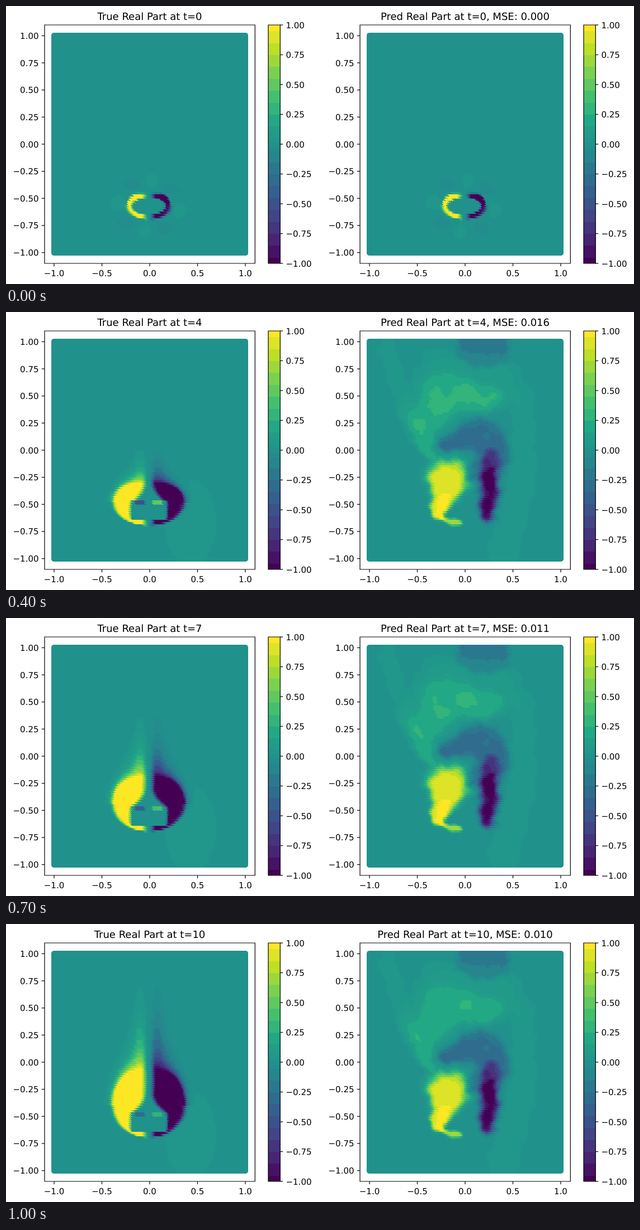
Write an HTML page with a canvas that moves like this. It is 1123 px wide and 499 px high and loops after 1.1 s.

```html
<!DOCTYPE html>
<html lang="en">
<head>
<meta charset="utf-8">
<title>True and predicted real part</title>
<style>
  html, body { margin: 0; width: 100%; height: 100%; overflow: hidden; background: #fff; }
  canvas, svg { position: absolute; left: 0; top: 0; width: 1123px; height: 499px; }
  text { font: 15px "DejaVu Sans", sans-serif; fill: #000; text-rendering: geometricPrecision; }
  .title { font-size: 18px; text-anchor: middle; }
  .line { fill: none; stroke: #000; stroke-width: 1.2; }
</style>
</head>
<body>
<canvas id="field" width="1123" height="499"></canvas>
<svg id="axes" viewBox="0 0 1123 499"></svg>
<script>
const STEP = 100, STEPS = 11, SHIFT = 564;
const CX = 257, CY = 248, HALF_X = 171, HALF_Y = 194.6;
const ctx = document.getElementById('field').getContext('2d');
const svg = document.getElementById('axes');
const clamp = (v, lo = 0, hi = 1) => Math.max(lo, Math.min(hi, v));
const sigmoid = v => 1 / (1 + Math.exp(-v));

// ---- colours: viridis in flat bands ----
const viridis = ['440154', '482475', '414487', '355f8d', '2a788e', '21918c',
  '22a884', '44bf70', '7ad151', 'bddf26', 'fde725']
  .map(h => [0, 2, 4].map(i => parseInt(h.slice(i, i + 2), 16)));

function color(v) {
  v = clamp(v, -1, 1);
  const n = Math.abs(v) < 0.1 ? 25 : 10;
  const p = (Math.round(v * n) / n + 1) * 5;
  const i = Math.min(9, Math.floor(p));
  return viridis[i].map((c, k) => Math.round(c + (viridis[i + 1][k] - c) * (p - i)));
}

// ---- true field: two mirrored lobes growing upwards around a block ----
function haze(x, y, t) {
  const dx = x - 255, dy = y - 360;
  if (t < 3) {
    const r = Math.hypot(dx, dy * 1.2), reach = 55 + 12 * t;
    return -.035 * Math.cos(4 * Math.atan2(dy, dx) + 2.6) * Math.exp(-(((r - reach) / 18) ** 2));
  }
  return .036 * Math.exp(-.7 * (((x - 330) / 48) ** 2 + ((y - 380) / 82) ** 2) ** 2);
}

function trueField(t) {
  const grown = 1 - Math.exp(-.7 * t);
  const width = 38 + 26 * grown;
  const mid = 360 - 35 * (t / 10) ** .7;
  const rise = mid - (338 - 7.5 * t);
  const fade = 1 + 3.7 * t;
  const hole = { x: 29 + 2.5 * grown, y: 15 + 3 * grown, mid: 360 - 4 * grown,
                 power: 2 + 2 * Math.min(3, t) };
  const strip = t < 2 ? 0 : .25 + .9 / t;

  return (x, y) => {
    const d = x - 255.5, a = Math.abs(d), side = Math.sign(d);
    const block = ((a / hole.x) ** hole.power
      + (Math.abs(y - hole.mid) / hole.y) ** hole.power) ** (1 / hole.power);
    if (block < 1) return y < 346 && a > 6 && a < 25 ? side * strip : 0;

    let lobe;
    if (y < mid) {
      const out = Math.max(0, a - 20) / (width - 20);
      const n = Math.hypot(out, (mid - y) / rise);
      const falloff = rise / fade + 10 * out / n;
      lobe = n > 1 ? Math.exp(-falloff * (n - 1)) : 1;
    } else {
      const u = Math.min(1, (y - mid) / (384 - mid));
      lobe = sigmoid((width * Math.sqrt(1 - u * u) + 1 - a) / 1.5);
    }
    // The gap between the lobes opens out just above the block.
    const flare = y < 340 ? 22 * Math.min(1, t / 5) * clamp((y - 306) / 32) ** 2 : 0;
    const gap = clamp((a - 2.5 - flare) / 9);
    return -side * lobe * gap * clamp((block - 1) * 10) + haze(x, y, t);
  };
}

// ---- predicted field: soft strokes through points [x, y, radius] ----
const stroke = (amp, soft, ...pts) => ({ amp, at(x, y) {
  let q = Infinity;
  for (let i = 0; i < pts.length - 1; i++) {
    const [ax, ay, ar] = pts[i], [bx, by, br] = pts[i + 1];
    const ux = bx - ax, uy = by - ay;
    const f = clamp(((x - ax) * ux + (y - ay) * uy) / (ux * ux + uy * uy));
    q = Math.min(q, Math.hypot(x - ax - ux * f, y - ay - uy * f) / (ar + (br - ar) * f));
  }
  return sigmoid(soft * (1 - q));
} });

const greenArch = stroke(.2, 5, [193, 258, 10], [180, 205, 22], [222, 150, 36], [300, 155, 20]);
const plume = [
  greenArch,
  stroke(.08, 7, [180, 175, 40], [225, 130, 55], [310, 130, 45]),
  stroke(.95, 7, [226, 302, 34], [208, 364, 10]),
  stroke(.75, 4, [214, 368, 5], [246, 382, 4]),
  stroke(-.27, 8, [225, 235, 14], [285, 222, 30], [312, 250, 25], [302, 300, 18]),
  stroke(-.4, 6, [303, 262, 15], [298, 320, 18], [299, 363, 14]),
  stroke(-.55, 5, [301, 290, 9], [300, 335, 14], [297, 364, 9]),
  stroke(-.2, 6, [266, 295, 10], [284, 272, 14]),
  stroke(-.17, 12, [272, 70, 28], [306, 66, 32]),
  stroke(.036, 12, [362, 150, 18], [360, 300, 26], [325, 430, 28]),
  stroke(.036, 8, [118, 70, 16], [150, 170, 14], [182, 250, 8])
];

function predField(t) {
  if (t === 0) return trueField(0);
  const ease = 1 - .02 * (t - 1);
  return (x, y) => {
    // Gentle ripples give the contours their ragged look.
    const wx = x + 2.5 * Math.sin(y / 9) + 1.5 * Math.sin(y / 4 + x / 13);
    const wy = y + 2.5 * Math.sin(x / 10 + 1) + 1.5 * Math.sin(x / 5 - y / 17);
    const v = plume.reduce((sum, s) => sum + s.amp * s.at(wx, wy) * (s === greenArch ? ease : 1), 0);
    return v * (1 + .08 * Math.sin(x / 11) * Math.sin(y / 13));
  };
}

// ---- overlapping round markers: which marker shows at each pixel ----
const N = 100, LEFT = 80, TOP = 47, W = 355, H = 402, R = 5.3;
const points = [];
const owner = new Int16Array(W * H).fill(-1);
for (let j = 0; j < N; j++) {
  for (let i = 0; i < N; i++) {
    const x = CX + HALF_X * (2 * i / (N - 1) - 1), y = CY - HALF_Y * (2 * j / (N - 1) - 1);
    const id = points.push([x, y]) - 1;
    for (let py = Math.ceil(y - R - .5); py + .5 <= y + R; py++) {
      const half = Math.sqrt(Math.max(0, R * R - (py + .5 - y) ** 2));
      for (let px = Math.ceil(x - half - .5); px + .5 <= x + half; px++) {
        owner[(py - TOP) * W + px - LEFT] = id;
      }
    }
  }
}

const image = ctx.createImageData(W, H);
const pixels = new Uint32Array(image.data.buffer);
function paint(field, shift) {
  const shades = points.map(([x, y]) => {
    const [r, g, b] = color(field(x - 2, y + 4));
    return (255 << 24 | b << 16 | g << 8 | r) >>> 0;
  });
  for (let i = 0; i < pixels.length; i++) pixels[i] = owner[i] < 0 ? 0xffffffff : shades[owner[i]];
  ctx.putImageData(image, LEFT + shift, TOP);
}

// ---- axes, colour bars and labels ----
function add(tag, attrs, text = '') {
  const el = document.createElementNS('http://www.w3.org/2000/svg', tag);
  for (const k in attrs) el.setAttribute(k, attrs[k]);
  el.textContent = text;
  return svg.appendChild(el);
}
const line = d => add('path', { class: 'line', d });
const label = (x, y, anchor, v, digits) =>
  add('text', { x, y, 'text-anchor': anchor }, v.toFixed(digits).replace('-', '\u2212'));

function panel(shift) {
  for (let y = 34; y < 462; y++) {
    ctx.fillStyle = `rgb(${color((CY - y) / 214)})`;
    ctx.fillRect(469 + shift, y, 21, 1);
  }
  line(`M${69 + shift} 34h376.3v428h-376.3z`);
  line(`M${469 + shift} 34h21.3v428h-21.3z`);
  for (let k = -2; k <= 2; k++) {
    const x = CX + shift + k * HALF_X / 2;
    line(`M${x} 462v5.2`);
    label(x, 485, 'middle', k / 2, 1);
  }
  for (let k = -4; k <= 4; k++) {
    const y = CY - k * HALF_Y / 4, yBar = CY - k * 53.5;
    line(`M${69 + shift} ${y}h-5.2`);
    label(58.5 + shift, y + 5.5, 'end', k / 4, 2);
    line(`M${490 + shift} ${yBar}h5.2`);
    label(500.5 + shift, yBar + 5.5, 'start', k / 4, 2);
  }
  return add('text', { class: 'title', x: CX + shift, y: 25 });
}

const trueTitle = panel(0), predTitle = panel(SHIFT);

let shown = -1;
function show(t) {
  if (t === shown) return;
  shown = t;
  const mse = t ? .01 + .015 * Math.exp(-((t / 4.1) ** 2)) : 0;
  paint(trueField(t), 0);
  paint(predField(t), SHIFT);
  trueTitle.textContent = `True Real Part at t=${t}`;
  predTitle.textContent = `Pred Real Part at t=${t}, MSE: ${mse.toFixed(3)}`;
}

show(0);
const start = performance.now();
function tick() {
  show(Math.floor((performance.now() - start) / STEP) % STEPS);
  requestAnimationFrame(tick);
}
requestAnimationFrame(tick);
</script>
</body>
</html>
```
